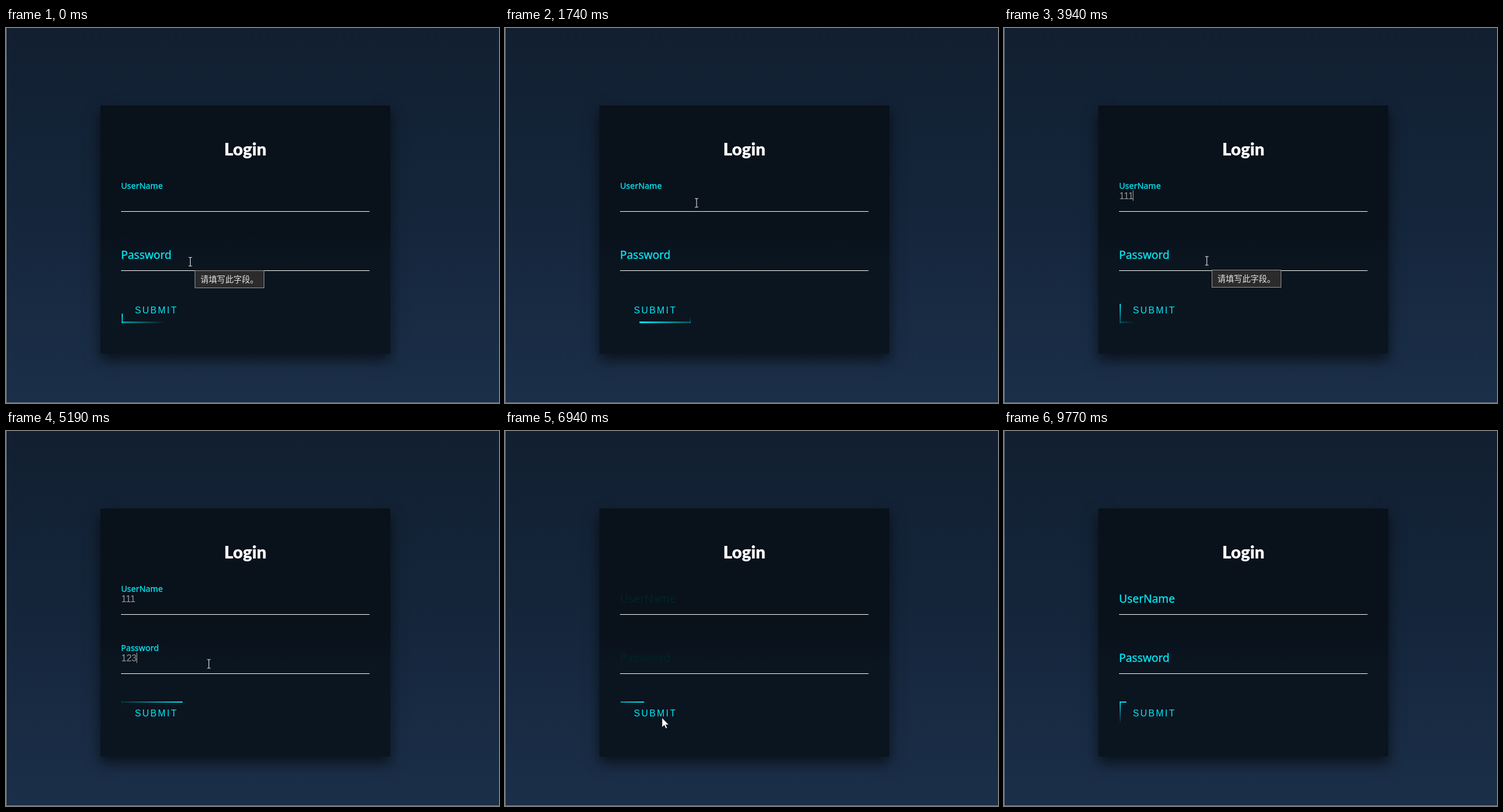
Recreate the animation shown at these times as an HTML page. Size 857 px wide and 653 px high, loop 9.87 s.

```html
<!DOCTYPE html>
<html lang="en">
<head>
<meta charset="utf-8">
<title>Login</title>
<style>
  html, body { margin: 0; width: 100%; height: 100%; overflow: hidden; }
  body { background: #121f31; }
  #stage {
    position: relative; width: 857px; height: 653px; overflow: hidden;
    background: linear-gradient(#121f31, #14253a 45%, #1b2f49);
  }
  #stage > * { position: absolute; }
  .edge { inset: 0; border: solid #7d858d; border-width: 0 0 1px 1px; }
  .card {
    left: 164px; top: 135px; width: 504px; height: 432px;
    background: linear-gradient(#09111b, #09111b 50%, #0a1520 62%, #0a1520);
    box-shadow: 0 11px 22px rgb(0 0 0 / .6);
  }
  #button {
    --p: 0;
    --glow: rgb(3 233 244 / var(--p));
    left: 201px; top: 471px; width: 122px; height: 43px; overflow: hidden;
    background: var(--glow);
    border-radius: calc(6px * var(--p));
    box-shadow: 0 0 calc(6px * var(--p)) var(--glow), 0 0 calc(30px * var(--p)) var(--glow),
      0 0 calc(60px * var(--p)) var(--glow), 0 0 calc(120px * var(--p)) var(--glow);
  }
  #button i { position: absolute; background: linear-gradient(var(--to), transparent, #03e9f4); }
  #button i:nth-child(odd) { left: 0; width: 100%; height: 2px; }
  #button i:nth-child(even) { top: 0; width: 2px; height: 100%; }
  #button i:nth-child(1) { top: 0; --to: 90deg; }
  #button i:nth-child(2) { right: 0; --to: 180deg; }
  #button i:nth-child(3) { bottom: 0; height: 3px; --to: 270deg; }
  #button i:nth-child(4) { left: 0; --to: 0deg; }
  svg { left: 0; top: 0; overflow: visible; }
  text { font-family: "Noto Sans", "Open Sans", sans-serif; white-space: pre; }
  .title { font: 900 30px Lato, "Open Sans", sans-serif; fill: #fff; text-anchor: middle; }
  .label { stroke: currentColor; fill: currentColor; stroke-width: .3px; }
  .value, #submit { font-family: "Liberation Sans", Arial, sans-serif; font-size: 16px; }
  .value { fill: #999; }
  #submit { letter-spacing: 2.4px; }
  #tip {
    box-sizing: border-box; width: 121px; height: 31px; padding-left: 9px;
    border: 1px solid #9a9a9a; background: #2b2b2b; color: #e4e4e4; white-space: nowrap;
    font: 14.4px/28px "Noto Sans CJK SC", "Noto Sans CJK", sans-serif;
  }
</style>
</head>
<body>
<div id="stage">
  <div class="card"></div>
  <div id="button"><i></i><i></i><i></i><i></i></div>
  <svg width="857" height="653">
    <text class="title" x="416" y="221.5">Login</text>
    <path d="M200 319.5h432M200 422.5h432" stroke="#fff" shape-rendering="crispEdges"/>
    <text id="userLabel" class="label" x="200">UserName</text>
    <text id="passLabel" class="label" x="200">Password</text>
    <text id="user" class="value" x="200.5" y="298"></text>
    <text id="pass" class="value" x="200.5" y="401"></text>
    <rect id="caret" width="1" height="18" fill="#aaa" shape-rendering="crispEdges"/>
    <text id="submit" x="224" y="497">SUBMIT</text>
  </svg>
  <div id="tip">请填写此字段。</div>
  <svg id="cursor" width="1" height="1">
    <path id="beam" d="M-3 -7.5h2.5l.5 .5l.5 -.5h2.5M0 -7V7M-3 7.5h2.5l.5 -.5l.5 .5h2.5"
      fill="none" stroke="#e8e8e8" stroke-width="1.1"/>
    <path id="arrow" d="M0 0V16.5L3.9 12.8L6.6 18.6L9 17.5L6.4 11.9H11.6Z"
      fill="#fff" stroke="#111" stroke-width=".6"/>
  </svg>
  <div class="edge"></div>
</div>
<script>
const LOOP = 9870, FREEZE = 6120, RELOAD = 6670, BORDER_START = 6859;
const TURN = 962;          // one lap of the button border
const HOVER = 5985, FADE_IN = 6872, LEAVE = 8800;
const $ = id => document.getElementById(id);
const show = (id, on) => { $(id).style.display = on ? '' : 'none'; };
const bars = [...document.querySelectorAll('#button i')];

const user = { id: 'user', text: '111', top: 283, focus: 100, type: 2160, gap: 270 };
const pass = { id: 'pass', text: '123', top: 386, focus: 4450, type: 4750, gap: 140 };

// Pointer moves: from, until, target
const home = [320.4, 407];
const moves = [
  [300, 900, 333, 304.5], [3150, 3490, 352.6, 405.5], [5610, 5980, 273, 499.5], [8570, 8690, 504, 563],
];
const tipTimes = [[0, 300], [1800, user.type], [3850, pass.focus]];

const clamp = v => Math.min(1, Math.max(0, v));

// The screen refreshes in steps and freezes while the page reloads
function snap(t) {
  if (t >= RELOAD) return RELOAD + 134.7 * Math.floor((t - RELOAD) / 134.7);
  return Math.min(FREEZE, 136 * Math.floor((t + 28) / 136));
}

// CSS "ease": cubic-bezier(.25, .1, .25, 1)
function ease(x) {
  x = clamp(x);
  let lo = 0, hi = 1;
  for (let i = 0; i < 24; i++) {
    const s = (lo + hi) / 2;
    if (.75 * s * (1 - s) + s ** 3 < x) lo = s; else hi = s;
  }
  return .3 * lo * (1 - lo) ** 2 + 3 * lo * lo * (1 - lo) + lo ** 3;
}
const easeFrom = (t, start) => ease((t - start) / 500);

function drawLabel(el, baseline, float, bright) {
  el.setAttribute('y', baseline - 19 * float);
  el.style.fontSize = 19.4 - 4.9 * float + 'px';
  el.style.color = `rgb(${3 * bright} ${233 * bright} ${244 * bright})`;
}

function drawBars(turns) {
  bars.forEach((bar, i) => {
    const age = turns - i / 4;
    const d = age < 0 ? -1 : 2 * Math.min(1, 2 * (age % 1)) - 1;
    const shift = (i < 2 ? d : -d) * 100;
    bar.style.transform = `translate${i % 2 ? 'Y' : 'X'}(${shift}%)`;
  });
}

const typedCount = (field, t) =>
  Math.min(field.text.length, Math.max(0, Math.floor((t - field.type) / field.gap) + 1));

function drawCaret(t) {
  const field = t < pass.focus ? user : pass;
  const n = typedCount(field, t);
  const since = t - (n ? field.type + (n - 1) * field.gap : field.focus);
  show('caret', t < RELOAD && since >= 0 && since % 1060 < 530);
  $('caret').setAttribute('x', Math.floor(200.5 + $(field.id).getComputedTextLength()));
  $('caret').setAttribute('y', field.top);
}

function drawPointer(t) {
  let [x, y] = home;
  for (const [from, until, toX, toY] of moves) {
    const f = clamp((t - from) / (until - from));
    x += (toX - x) * f;
    y += (toY - y) * f;
  }
  const inField = x > 200 && x < 632 && [user, pass].some(f => y > f.top && y < f.top + 37);
  $('cursor').style.transform = `translate(${x}px, ${y}px)`;
  show('cursor', t < LEAVE);
  show('beam', inField);
  show('arrow', !inField);
  show('tip', tipTimes.some(([from, until]) => t >= from && t < until));
  $('tip').style.transform = `translate(${Math.round(x + 8)}px, ${Math.round(y + 15.4)}px)`;
}

function draw(t) {
  const loaded = t >= RELOAD;
  const bright = loaded ? easeFrom(t, FADE_IN) : 1;
  const hover = loaded ? 0 : easeFrom(t, HOVER);

  drawLabel($('userLabel'), 299, loaded ? 0 : 1, bright);
  drawLabel($('passLabel'), 402, loaded ? 0 : easeFrom(t, pass.focus), bright);
  for (const f of [user, pass])
    $(f.id).textContent = loaded ? '' : f.text.slice(0, typedCount(f, t));
  $('button').style.setProperty('--p', hover.toFixed(4));
  $('submit').style.fill = `rgb(${3 + 252 * hover} ${233 + 22 * hover} ${244 + 11 * hover})`;
  drawBars(loaded ? (t - BORDER_START) / TURN : 1.845 + t / TURN);
  drawCaret(t);
  drawPointer(t);
}

const start = performance.now();
function frame() {
  draw(snap((performance.now() - start) % LOOP));
  requestAnimationFrame(frame);
}
frame();
</script>
</body>
</html>
```
